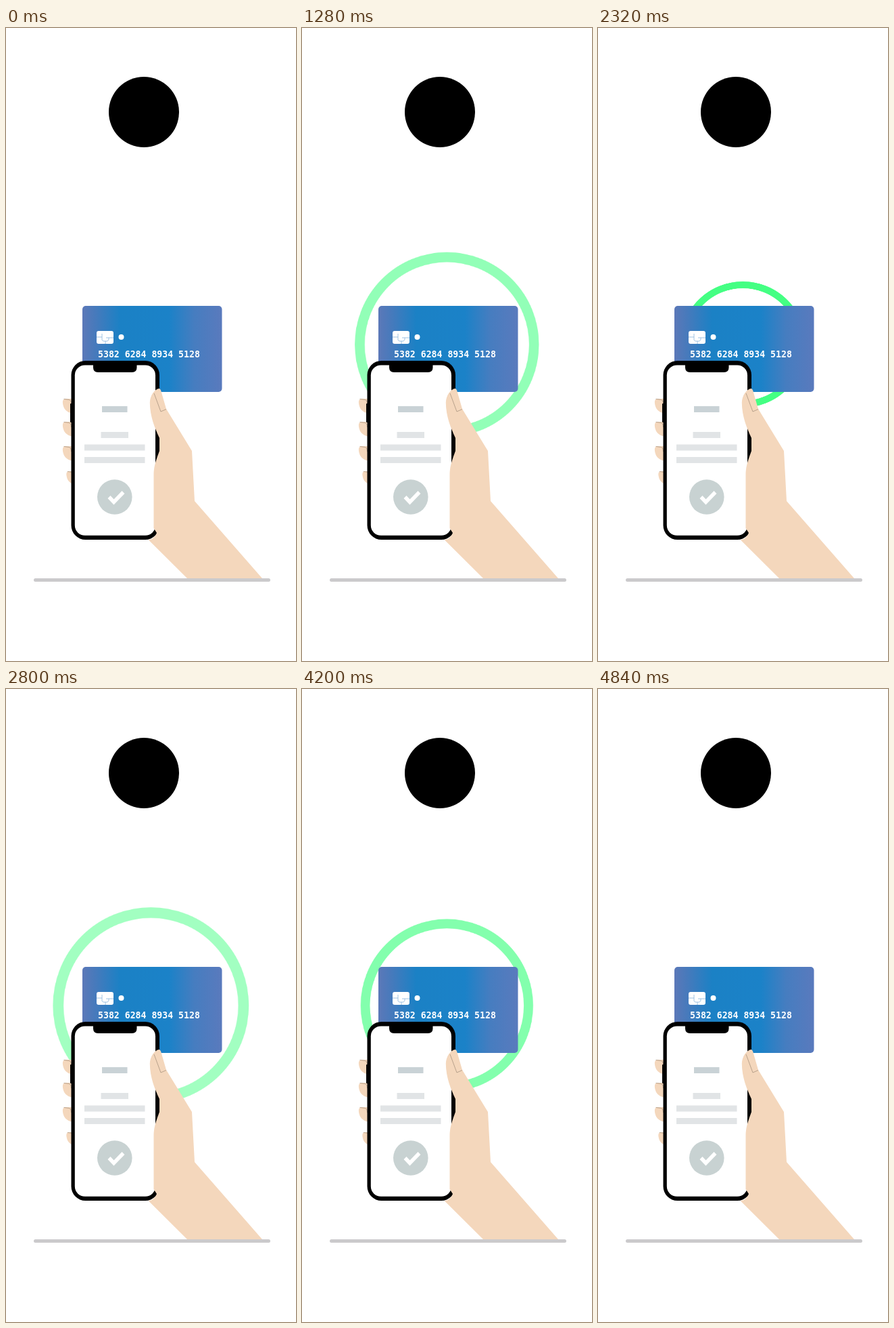
Animation of 429x934 px, one loop 5520 ms. Source, as an HTML page:

```html
<!DOCTYPE html>
<html lang="en">
<head>
<meta charset="utf-8">
<title>Contactless payment</title>
<style>
  html, body { margin: 0; width: 100%; height: 100%; overflow: hidden; background: #fff; }
  svg { display: block; width: 100%; height: 100%; }

  .skin { fill: #f4d7bc; }
  .nail { fill: none; stroke: #a08c78; stroke-width: .7; }
  .number { font: bold 13.2px "DejaVu Sans Mono", monospace; fill: #fff; white-space: pre; }

  .ring {
    fill: none;
    stroke: #06ff5a;
    stroke-width: 10.8;
    animation: pulse 5520ms infinite;
  }

  /* Three pulses of 1280 ms, starting at 560, 2000 and 3560 ms */
  @keyframes pulse {
    0%, 33.3333%, 59.4203%, 87.6812%, 100% {
      transform: scale(1.967);
      opacity: 0;
      animation-timing-function: step-end;
    }
    10.1449%, 36.2319%, 64.4928% {
      transform: scale(.585);
      opacity: 1;
      animation-timing-function: steps(32, end);
    }
  }
</style>
</head>
<body>
<svg viewBox="0 0 429 934" preserveAspectRatio="none">
  <defs>
    <linearGradient id="blue">
      <stop offset="0" stop-color="#5c78b8"/>
      <stop offset=".1" stop-color="#457abc"/>
      <stop offset=".27" stop-color="#1b81c5"/>
      <stop offset=".62" stop-color="#1b82c8"/>
      <stop offset=".8" stop-color="#467dc0"/>
      <stop offset="1" stop-color="#5a7abd"/>
    </linearGradient>
    <g id="finger">
      <path class="skin" d="M14 0H5C1 0 0 3 .5 7C1.5 15 6 20 14 21.5Z"/>
      <path class="nail" d="M2 .4L10 1.5Q13 2.5 13 8"/>
    </g>
  </defs>

  <circle cx="204" cy="124" r="52"/>

  <g transform="translate(214.3 467)">
    <circle class="ring" r="94.6"/>
  </g>

  <!-- Card -->
  <rect x="113" y="410" width="206.5" height="127" rx="5" fill="url(#blue)"/>
  <rect x="134" y="447" width="25" height="19" rx="3" fill="#fff"/>
  <path d="M134 456H142M142 451V460.5L144 462H150L152 460V457H159M148 457H152M147 462V466"
        fill="none" stroke="#8ab4dc" stroke-width=".8"/>
  <circle cx="170.5" cy="456" r="4" fill="#fff"/>
  <text class="number" x="136" y="486">5382 6284 8934 5128</text>

  <!-- Fingers -->
  <use href="#finger" x="83.5" y="547"/>
  <use href="#finger" x="83.5" y="581"/>
  <use href="#finger" x="83.5" y="617"/>
  <use href="#finger" transform="translate(89 654) scale(.9)"/>

  <!-- Phone -->
  <rect x="95" y="554" width="4" height="28" rx="1"/>
  <rect x="96.5" y="491" width="130.5" height="264" rx="21"/>
  <rect x="101.8" y="497.4" width="119.2" height="251.4" rx="15" fill="#fff"/>
  <path d="M129 495H193.500V501Q193.5 508 186.5 508H136Q129 508 129 501Z"/>
  <rect x="142" y="558" width="37.5" height="9" fill="#c9d2d6"/>
  <g fill="#e1e4e6">
    <rect x="140.5" y="596" width="40.5" height="9"/>
    <rect x="116" y="614.5" width="89.5" height="9"/>
    <rect x="116" y="633" width="89.5" height="9"/>
  </g>
  <circle cx="160.8" cy="692" r="25.8" fill="#c8d2d2"/>
  <path d="M152.500 692L159.5 699.5L173.5 685" fill="none" stroke="#fff" stroke-width="5.5"/>

  <!-- Hand -->
  <path class="skin" d="M226 532C220 533 213 542 212.8 553C213 573 220 590 227 605V624
    C221 640 218.5 648 218.5 660V738L223 745C220 752 215 755 210.5 755L268 812H379L279 698L275 624
    L237 562L229.5 536Q228.5 532 226 532Z"/>
  <path class="nail" d="M219 539L229 566L237 562.5"/>

  <rect x="41" y="812" width="350" height="5" rx="2.5" fill="#cbcacc"/>
</svg>
</body>
</html>
```
